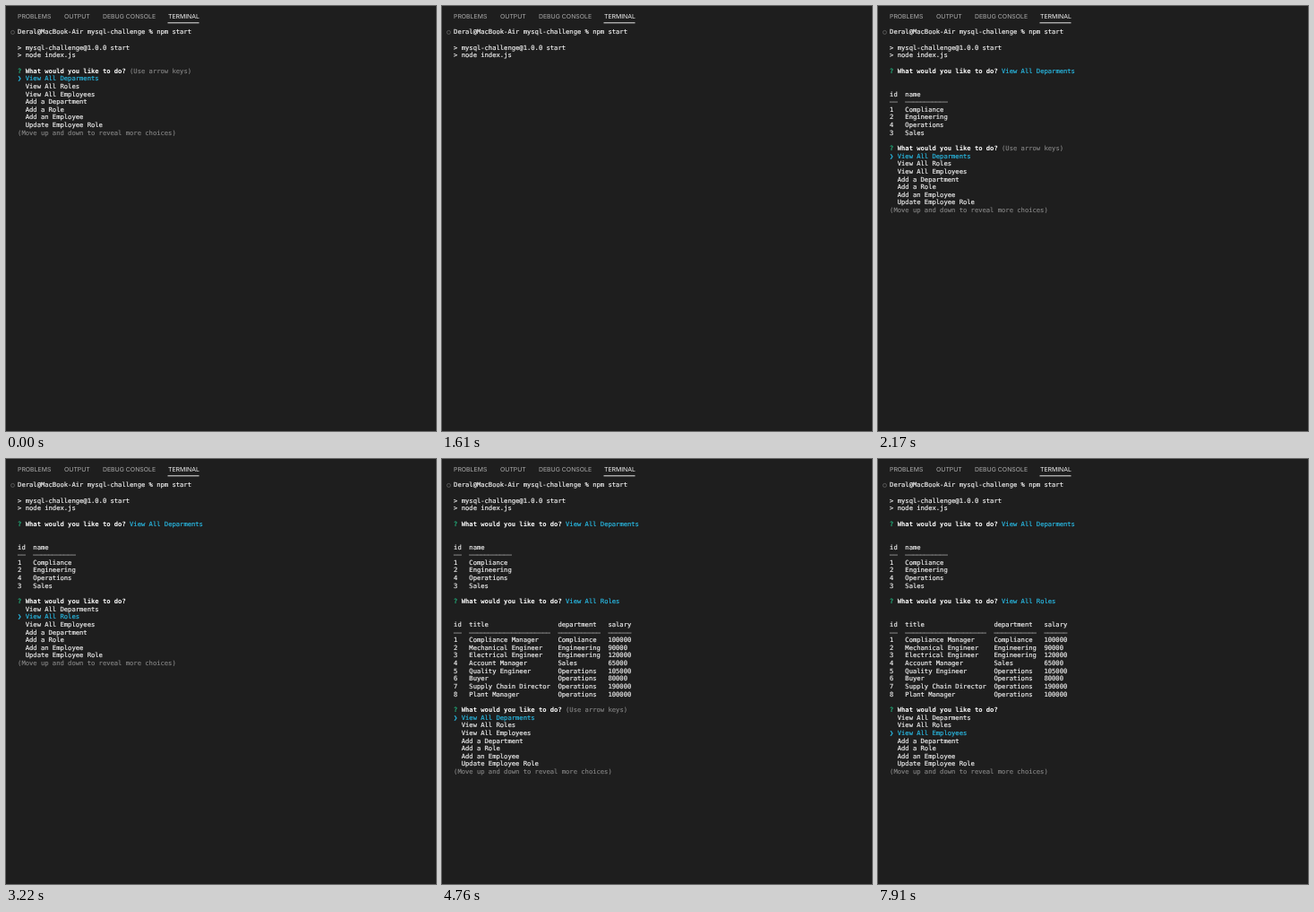
An HTML page that plays this animation: 480 px wide and 474 px high, repeating every 8 s.

```html
<!DOCTYPE html>
<html lang="en">
<head>
<meta charset="utf-8">
<title>Terminal menu</title>
<style>
  html, body { margin: 0; width: 100%; height: 100%; overflow: hidden; background: #1e1e1e; }
  #stage { position: relative; width: 480px; height: 474px; overflow: hidden; text-rendering: geometricPrecision; }
  svg { position: absolute; inset: 0; }
  .tabs { font: 6.9px Inter, sans-serif; fill: #adadad; }
  .tabs .on { fill: #f4f4f4; }
  pre {
    position: absolute; left: 13.1px; top: 25.4px; margin: 0;
    font: 7.17px/8.64px "DejaVu Sans Mono", monospace; color: #f0f0f0;
    font-variant-ligatures: none; -webkit-text-stroke: .18px;
  }
  b { color: #fff; -webkit-text-stroke: 0; }
  .ok { color: #23c488; }
  .pick { color: #29bae4; }
  .dim { color: #8a8a8a; -webkit-text-stroke: .1px; }
</style>
</head>
<body>
<div id="stage">
  <pre id="term"></pre>
  <svg width="480" height="474">
    <defs>
      <path id="beam" d="M-2.5 -5Q0 -5 0 -3.5V3.5Q0 5 -2.5 5M2.5 -5Q0 -5 0 -3.5M0 3.5Q0 5 2.5 5M-1.2 1.5H1.2"/>
    </defs>
    <g class="tabs">
      <text x="13" y="14">PROBLEMS</text>
      <text x="65" y="14">OUTPUT</text>
      <text x="108" y="14">DEBUG CONSOLE</text>
      <text x="181" y="14" class="on">TERMINAL</text>
    </g>
    <path d="M180.5 18.8H215.5" stroke="#e7e7e7"/>
    <circle cx="7.5" cy="29.4" r="2" fill="none" stroke="#6c6c6c" stroke-width=".7"/>
    <g id="mouse" fill="none" stroke-linecap="round">
      <use href="#beam" stroke="#111" stroke-width="2.4"/>
      <use href="#beam" stroke="#fff"/>
    </g>
  </svg>
</div>
<script>
const LOOP = 8000;
const term = document.getElementById('term');
const mouse = document.getElementById('mouse');

const span = (cls, text) => `<span class="${cls}">${text}</span>`;
const choices = ['View All Deparments', 'View All Roles', 'View All Employees',
  'Add a Department', 'Add a Role', 'Add an Employee', 'Update Employee Role'];

const ask = tail => `${span('ok', '?')} <b>What would you like to do?</b> ${tail}\n`;

const menu = (pick, hint) => ask(hint ? span('dim', '(Use arrow keys)') : '') +
  choices.map((c, i) => i === pick ? span('pick', '❯ ' + c) : '  ' + c).join('\n') +
  '\n' + span('dim', '(Move up and down to reveal more choices)');

// Columns are as wide as their longest cell, two spaces apart.
function table(head, rows) {
  const all = [head, ...rows].map(r => r.split('|'));
  const widths = all[0].map((_, i) => Math.max(...all.map(r => r[i].length)));
  const lines = all.map(r => r.map((c, i) => c.padEnd(widths[i])).join('  '));
  lines.splice(1, 0, widths.map(w => '–'.repeat(w)).join('  '));
  return '\n\n' + lines.join('\n') + '\n\n';
}

const start = 'Deral@MacBook-Air mysql-challenge % npm start\n\n' +
  '&gt; mysql-challenge@1.0.0 start\n&gt; node index.js\n\n';

const departments = start + ask(span('pick', choices[0])) +
  table('id|name', ['1|Compliance', '2|Engineering', '4|Operations', '3|Sales']);

const roles = departments + ask(span('pick', choices[1])) +
  table('id|title|department|salary', [
    '1|Compliance Manager|Compliance|100000',
    '2|Mechanical Engineer|Engineering|90000',
    '3|Electrical Engineer|Engineering|120000',
    '4|Account Manager|Sales|65000',
    '5|Quality Engineer|Operations|105000',
    '6|Buyer|Operations|80000',
    '7|Supply Chain Director|Operations|190000',
    '8|Plant Manager|Operations|100000'
  ]);

const screens = [
  [0, start + menu(0, true)],
  [1610, start],
  [1820, departments + menu(0, true)],
  [3150, departments + menu(1)],
  [4340, departments],
  [4410, roles + menu(0, true)],
  [6020, roles + menu(1)],
  [7840, roles + menu(2)]
];

let shown;
function draw(t) {
  const screen = screens.findLast(s => s[0] <= t);
  if (screen !== shown) term.innerHTML = (shown = screen)[1];

  const visible = t >= 70 && t < 910;
  mouse.style.display = visible ? '' : 'none';
  if (visible) {
    const left = (1 - Math.min(1, (t - 70) / 700)) ** 2;
    mouse.setAttribute('transform', `translate(${162.5 + 74 * left} ${250 + 216 * left})`);
  }
}

const t0 = performance.now();
function tick() {
  draw((performance.now() - t0) % LOOP);
  requestAnimationFrame(tick);
}
tick();
</script>
</body>
</html>
```
